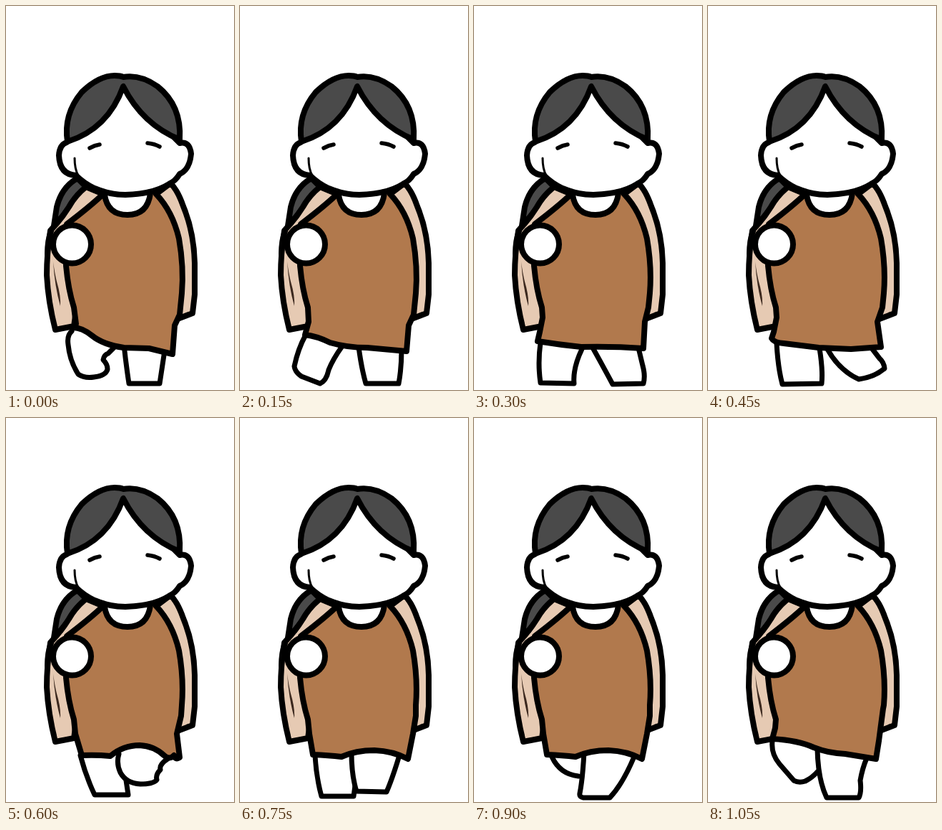
Recreate the animation shown at these times as an HTML page. Size 319 px wide and 535 px high, loop 1200 ms.

```html
<!DOCTYPE html>
<html lang="en">
<head>
<meta charset="utf-8">
<title>Walk cycle</title>
<style>
  html, body { margin: 0; width: 100%; height: 100%; overflow: hidden; background: #fff; }
  svg { display: block; width: 100%; height: 100%; }
  .ink { stroke: #000; stroke-width: 8; stroke-linecap: round; stroke-linejoin: round; fill: none; }
  .leg { stroke-width: 7; }
  .skin { fill: #fff; }
  .hair { fill: #4a4a4a; }
  .coat { fill: #e6cab3; }
  .dress { fill: #b1794d; }
  .eye { stroke-width: 5.5; }
  .fine { stroke-width: 3; }
</style>
</head>
<body>
<svg viewBox="0 0 319 535">
  <g class="ink">
    <path class="hair" d="M100 240Q78 252 71 280L67 306L78 294Q92 276 112 252Z"/>
    <path class="coat" d="M112 252Q97 264 88 280Q80 293 71 303L62 313Q57 345 57 375Q59 412 69 451L95 446L110 340L136 262Z"/>
    <path class="coat" d="M210 262L230 247Q240 256 248 279Q263 315 264 358L264 402L261 428L240 436Z"/>
  </g>
  <path d="M66 356Q68 390 76 418Q77 404 71 384Q68 372 66 356Z" fill="#3b281e"/>
  <g id="poses" class="ink"></g>
  <g class="ink">
    <path class="skin" d="M138 263Q142 291 170 291Q198 291 202 261"/>
    <path class="skin" d="M85 190Q75 193 74 208Q75 235 98 236Q109 247 124 254Q145 263 167 263Q206 262 228 248Q237 244 243 234Q257 228 259 206Q257 188 243 191L164 112Z"/>
    <path class="hair" d="M86 189Q80 151 106 120Q130 97 152 97Q160 97 164 99Q188 95 212 112Q246 139 243 186Q191 165 164 112Q143 171 86 189Z"/>
    <path class="fine" d="M96 212Q96 227 101 236"/>
    <path class="eye" d="M117 198Q124 194 131 193M198 191Q208 192 215 196"/>
    <path d="M63 314Q58 326 58 346"/>
    <circle class="skin" cx="92.5" cy="332" r="26.5"/>
  </g>
</svg>
<script>
const STEP = 150;
const bodice = {
  left: 'M136 262Q118 279 85 304L84 362Q87 395 95 420',
  right: 'L246 400Q249 364 242 324Q233 286 210 262'
};

// Each pose: rear leg, front leg, hem from left side to right side.
const poses = [
  ['M165 472Q168 500 172 526L215 526Q219 500 222 480',
   'M92 453Q85 459 87 472Q89 494 101 513Q110 519 123 517Q140 515 142 506Q142 499 136 493Q137 486 143 484L152 475',
   'L98 443L94 448Q106 448 120 459Q136 472 165 476L200 477L233 485L236 445L243 430'],
  ['M166 475Q170 505 176 526L222 526Q226 505 226 478',
   'M92 458Q81 478 76 502Q77 510 86 516L112 526Q121 522 124 507Q130 492 143 474',
   'L96 440L91 458Q108 460 126 469Q150 476 178 476L233 481L236 445L243 430'],
  ['M166 476Q180 501 194 527L237 526Q240 515 236 501L230 476',
   'M93 469Q89 498 93 525L140 526Q138 505 151 478',
   'L96 434L92 454L89 467Q120 472 150 475Q195 474 237 477L239 440L244 420'],
  ['M167 478Q184 508 211 520Q233 517 247 505Q246 496 240 491L230 478',
   'M96 470Q98 505 104 527L159 526Q161 508 156 477',
   'L96 434L92 454L89 463Q92 469 106 470L155 476L200 478L242 475L237 440L244 420'],
  ['M104 470Q112 500 124 525L171 525L168 505',
   'M158 468Q154 481 160 494Q168 509 188 510Q207 510 211 504Q209 497 216 490Q214 483 226 475',
   'L97 440L106 470Q127 469 146 471Q164 456 187 456Q207 457 221 470Q229 477 235 470Q237 477 243 473L239 440L245 415'],
  ['M105 471Q107 502 114 527L159 527L162 505',
   'M156 466Q156 498 163 520L205 521Q213 503 223 470',
   'L97 440L102 469Q124 470 142 472Q162 463 188 463Q214 464 235 475L242 440L246 415'],
  ['M109 472Q120 496 146 499',
   'M154 466Q152 503 148 523Q147 528 153 529L190 529Q208 510 224 472',
   'L97 440L102 469Q124 470 142 472Q162 463 188 463Q214 464 235 475L242 440L246 415'],
  ['M90 450Q88 468 100 482L120 505Q127 509 136 506Q146 501 153 493',
   'M153 462Q154 504 166 529L211 529Q215 522 213 505Q216 488 222 474',
   'L94 432L90 447Q126 449 148 459Q168 467 192 468L235 475L239 450L245 405']
];

const root = document.getElementById('poses');
const share = 1 / poses.length;

const make = (name, parent, className = '', d = '') => {
  const node = document.createElementNS('http://www.w3.org/2000/svg', name);
  if (className) node.setAttribute('class', className);
  if (d) node.setAttribute('d', d);
  return parent.appendChild(node);
};

poses.forEach(([rear, front, hem], i) => {
  const group = make('g', root);
  make('path', group, 'leg skin', rear);
  make('path', group, 'leg skin', front);
  make('path', group, 'dress', bodice.left + hem + bodice.right);
  group.animate([
    { visibility: 'visible', offset: 0 },
    { visibility: 'visible', offset: share },
    { visibility: 'hidden', offset: share },
    { visibility: 'hidden', offset: 1 }
  ], {
    duration: STEP * poses.length,
    delay: STEP * (i - poses.length),
    iterations: Infinity
  });
});
</script>
</body>
</html>
```
